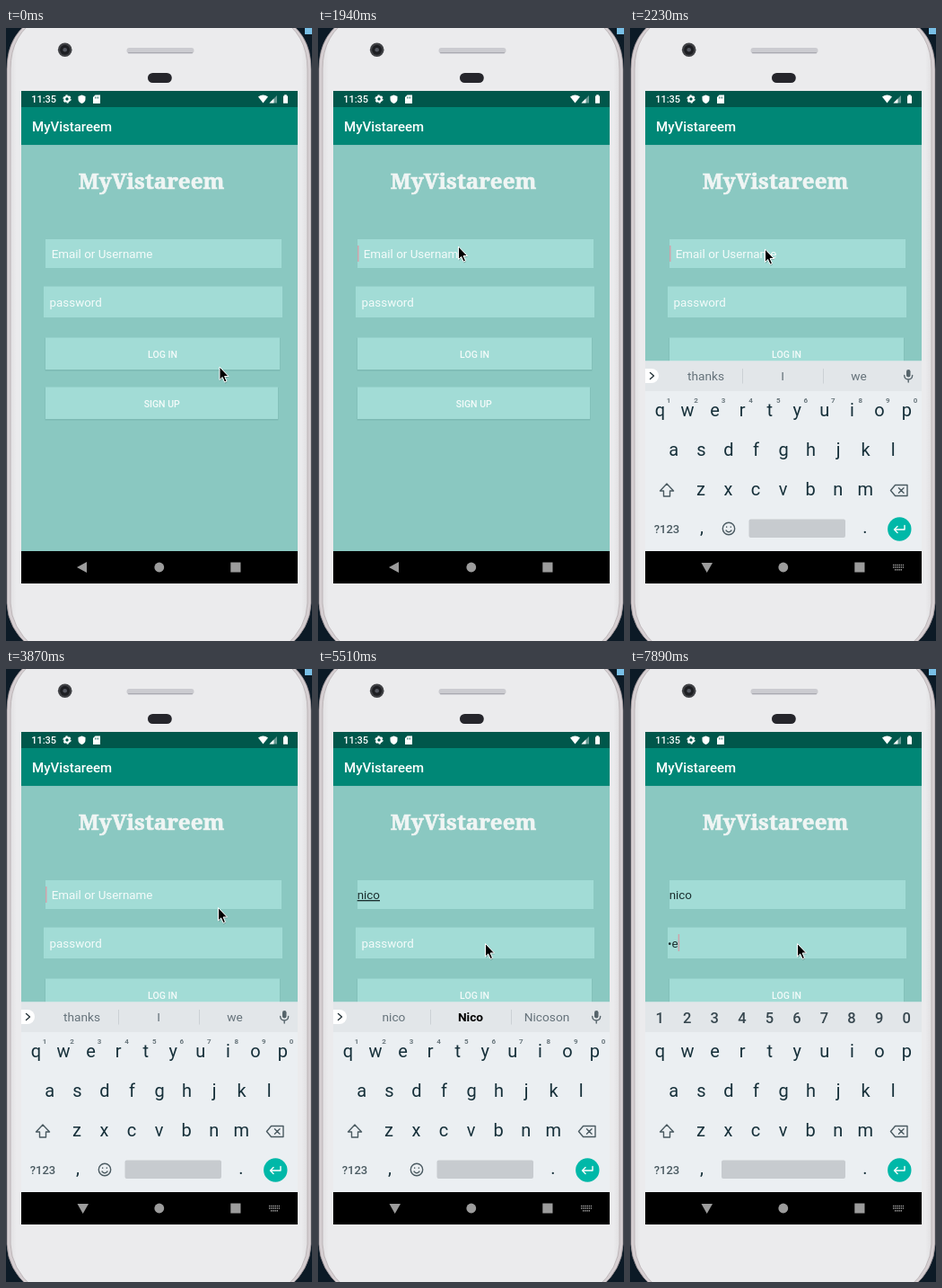
Write an HTML page that moves like this. It is 341 px wide and 682 px high and loops after 8 s.

```html
<!DOCTYPE html>
<html lang="en">
<head>
<meta charset="utf-8">
<title>Login screen</title>
<style>
  html, body { margin: 0; width: 100%; height: 100%; overflow: hidden; background: #0c1a26; }
  svg { display: block; width: 100vw; height: 100vh; }
  text { font-family: Roboto, sans-serif; white-space: pre; }
  .mid { text-anchor: middle; }
  .field { fill: #a2dcd6; }
  .shade { fill: #7dbab3; }
  .hint { font-size: 13.4px; fill: #f4fbfa; }
  .typed { font-size: 13.4px; fill: #1b2f2f; }
  .button { font-size: 10.5px; font-weight: 500; fill: #f4fbfa; }
  .logo { font: bold 24.2px "Noto Serif", serif; fill: #f0f5f4; stroke: #f0f5f4; stroke-width: .7; }
  .key { font-size: 20px; fill: #16303a; }
  .small { font-size: 8px; font-weight: 700; fill: #6a777d; }
  .digit { font-size: 16.5px; font-weight: 500; fill: #37474f; }
  .word { font-size: 13.7px; fill: #65727a; }
  .line { fill: none; stroke: #4a5a61; stroke-width: 1.4; stroke-linejoin: round; stroke-linecap: round; }
</style>
</head>
<body>
<svg viewBox="0 0 341 682" preserveAspectRatio="none">
  <defs>
    <linearGradient id="body">
      <stop offset="0" stop-color="#e2e1e3"/>
      <stop offset=".02" stop-color="#ebebed"/>
      <stop offset=".98" stop-color="#ebebed"/>
      <stop offset="1" stop-color="#e0dfe1"/>
    </linearGradient>
  </defs>

  <!-- phone -->
  <rect width="341" height="682" fill="#0c1a26"/>
  <rect x="333" width="8" height="7" fill="#79bfe6"/>
  <path d="M36 -12Q1 4 1 46V640Q2 668 26 688H315Q339 668 340 640V46Q340 4 305 -12Z" fill="#d6cfd2" stroke="#9a9094" stroke-width=".8"/>
  <path d="M38 -12Q5 6 5 46V640Q6 667 30 688H311Q335 667 336 640V46Q336 6 303 -12Z" fill="url(#body)" stroke="#b3abae" stroke-width=".8"/>
  <circle cx="65.700" cy="24.300" r="7.800" fill="#3f4044"/>
  <circle cx="65.700" cy="24.300" r="5.500" fill="#1d1e22"/>
  <circle cx="65.700" cy="24.300" r="2.300" fill="#53565f"/>
  <rect x="134.500" y="22" width="75" height="6.300" rx="3" fill="#cbcbd0"/>
  <rect x="136" y="27" width="72" height="1.300" rx=".6" fill="#a9a9b0"/>
  <rect x="158" y="50" width="26.800" height="11" rx="5.500" fill="#25252b"/>

  <!-- app -->
  <rect x="17" y="70" width="308" height="548" fill="#8ac8c1"/>
  <rect x="17" y="130" width="308" height="1" fill="#84c2bb"/>
  <rect x="17" y="70" width="308" height="18" fill="#00574b"/>
  <rect x="17" y="88" width="308" height="42" fill="#008776"/>
  <g fill="#fff">
    <text x="28.200" y="83" font-size="11" font-weight="500">11:35</text>
    <circle cx="68" cy="79" r="2.700" fill="none" stroke="#fff" stroke-width="2"/>
    <circle cx="68" cy="79" r="4" fill="none" stroke="#fff" stroke-width="1.300" stroke-dasharray="2.200 1.989"/>
    <path d="M84.500 74.500L88.500 76V79Q88.500 82.500 84.500 84Q80.500 82.500 80.500 79V76Z"/>
    <path d="M99.500 74.500H105V84H97V77Z"/>
    <path d="M99.500 76.500V78.500M101.300 76.500V78.500M103 76.500V78.500" stroke="#00574b" stroke-width=".7"/>
    <path d="M281 76.500Q286.500 72.500 292 76.500L286.500 83.500Z"/>
    <path d="M302 75V83.500H293.500Z" opacity=".4"/>
    <path d="M298.500 78.500V83.500H293.500Z"/>
    <path d="M309 75.500H310.200V74.300H312.800V75.500H314V83.800H309Z"/>
    <text x="29" y="115" font-size="15" font-weight="500">MyVistareem</text>
  </g>
  <text class="logo mid" x="162" y="179">MyVistareem</text>

  <rect class="field" x="44" y="235" width="263" height="32"/>
  <rect class="field" x="42" y="287.500" width="266" height="34.500"/>
  <rect class="shade" x="43.500" y="345" width="262" height="36.500"/>
  <rect class="field" x="44" y="344.500" width="261" height="35.500"/>
  <rect class="shade" x="43.500" y="400" width="260" height="36.500"/>
  <rect class="field" x="44" y="399.500" width="259" height="35.500"/>
  <text class="button mid" x="174.500" y="366.500">LOG IN</text>
  <text class="button mid" x="173.700" y="422">SIGN UP</text>
  <text id="userHint" class="hint" x="50.700" y="256">Email or Username</text>
  <text id="passHint" class="hint" x="48.500" y="310">password</text>
  <text id="user" class="typed" x="43.700" y="256"></text>
  <text id="pass" class="typed" x="42" y="310"></text>
  <rect id="caret" width="1.500" fill="#cfa3ab"/>

  <!-- navigation bar -->
  <rect x="17" y="582" width="308" height="36" fill="#000"/>
  <g fill="#9c9c9c">
    <path id="back" d="M79 600L90 594V606Z"/>
    <path id="down" d="M79.500 595H92L85.700 606Z"/>
    <circle cx="170.800" cy="600" r="5.400"/>
    <rect x="250.300" y="594.500" width="11.200" height="11"/>
    <path id="keysIcon" d="M293 597.500H305M293 600H305M295 602.700H303" stroke="#9c9c9c" stroke-width="1.400" stroke-dasharray="1.400 .8"/>
  </g>

  <!-- keyboard -->
  <g id="keyboard">
    <rect x="17" y="370.500" width="308" height="211.500" fill="#ebeff2"/>
    <rect x="17" y="370.500" width="308" height="33.500" fill="#e2e6e9"/>
    <g id="letters"></g>
    <g id="wordStrip">
      <path d="M17 379H24A8 8 0 0 1 24 395H17Z" fill="#fff"/>
      <path class="line" d="M22.500 383.500L26.500 387L22.500 390.500" style="stroke:#26343a"/>
      <path d="M125.500 379V395.500M215.500 379V395.500" stroke="#cbd0d4"/>
      <text class="word mid" x="84.500" y="392"></text>
      <text class="word mid" x="170" y="392"></text>
      <text class="word mid" x="255" y="392"></text>
      <rect x="308" y="380" width="4.500" height="8.500" rx="2.250" fill="#56646b"/>
      <path class="line" d="M305.700 386.500Q306 391 310.200 391T314.700 386.500M310.200 391V394" style="stroke:#56646b"/>
      <g id="smallDigits"></g>
      <circle class="line" cx="110" cy="557" r="6.700"/>
      <path class="line" d="M107 559Q110 562.500 113 559M107.700 555V555.200M112.300 555V555.200"/>
    </g>
    <g id="digitStrip"></g>
    <path class="line" d="M41 507L48.500 515H44.500V521H37.500V515H33.500Z"/>
    <path class="line" d="M290.500 514.500L295.500 508.500H309V520.500H295.500ZM299.500 511.700L305 517.300M305 511.700L299.500 517.300"/>
    <text class="mid" x="41" y="561.500" font-size="13" font-weight="500" fill="#4a5a61">?123</text>
    <text class="key mid" x="80" y="562">,</text>
    <rect id="space" y="546.500" height="20.500" rx="2" fill="#c7cbcf"/>
    <text class="key mid" x="262" y="562">.</text>
    <circle cx="300.300" cy="557.500" r="13.200" fill="#00b8a8"/>
    <path class="line" d="M306 553.500V558H294.500M298 554.500L294.500 558L298 561.500" style="stroke:#fff"/>
  </g>

  <g id="pointer">
    <path d="M.5 1.500V16L3.700 13L6.100 18.400L8.500 17.300L6.100 12H10.500Z" fill="#000" opacity=".2"/>
    <path d="M0 0V14.500L3.200 11.500L5.600 17L8 16L5.600 10.500H10Z" fill="#000" stroke="#fff" stroke-linejoin="round"/>
  </g>
</svg>
<script>
const $ = id => document.getElementById(id);
const STEP = 30.55, LOOP = 8000;

function addKeys(group, chars, x, y, cls) {
  [...chars].forEach((char, i) => {
    const key = document.createElementNS("http://www.w3.org/2000/svg", "text");
    key.setAttribute("x", x + i * STEP);
    key.setAttribute("y", y);
    key.setAttribute("class", cls + " mid");
    key.textContent = char;
    $(group).append(key);
  });
}
addKeys("letters", "qwertyuiop", 33.5, 432, "key");
addKeys("letters", "asdfghjkl", 48.8, 476, "key");
addKeys("letters", "zxcvbnm", 79, 520, "key");
addKeys("smallDigits", "1234567890", 43, 417, "small");
addKeys("digitStrip", "1234567890", 33.2, 393.5, "digit");

const at = (x, y) => ({ pointer: [x, y] });
const caret = on => ({ caret: on });
const type = (user, ...rest) => ({ user, caret: true, words: [user, ...rest] });

// Each entry changes part of the state from its time on.
const events = [
  [0, { ...at(238, 377), caret: false, keyboard: 0, user: "", pass: "", secret: false, words: ["thanks", "I", "we"] }],
  [140, at(222, 350)], [290, at(188, 300)], [440, at(160, 263)], [590, at(152, 254)],
  [890, at(190, 282)], [1040, at(228, 306)],
  [1340, at(215, 290)], [1490, at(182, 260)], [1640, at(160, 245)],
  [1790, { ...at(156.5, 243), caret: true }],
  [2080, { keyboard: 0.6 }],
  [2230, { keyboard: 1, ...at(150.5, 246) }],
  [2380, at(152, 248)],
  [2530, { ...at(168, 252), caret: false }],
  [2680, at(198, 260)], [2830, at(226, 265)],
  [2970, { ...at(236.5, 265.5), caret: true }],
  [3420, caret(false)], [3870, caret(true)],
  [4020, type("n", "N", "no")],
  [4160, type("ni", "Ni", "nib")],
  [4460, type("nic", "Nico", "Nicoson")],
  [4760, type("nico", "Nico", "Nicoson")],
  [5210, { ...at(222, 277), caret: false }],
  [5360, at(197, 297)], [5510, at(186.5, 305.5)],
  [5650, { secret: true, caret: true }],
  [6100, caret(false)], [6700, caret(true)], [7150, caret(false)], [7590, caret(true)],
  [7740, { pass: "w" }], [7890, { pass: "•e" }]
];

const show = (id, on) => { $(id).style.display = on ? "" : "none"; };
const setAttrs = (el, attrs) => Object.entries(attrs).forEach(([k, v]) => el.setAttribute(k, v));
const wordSlots = document.querySelectorAll(".word");

function render(time) {
  const s = Object.assign({}, ...events.filter(e => e[0] <= time).map(e => e[1]));

  $("user").textContent = s.user;
  $("user").style.textDecoration = s.secret ? "none" : "underline";
  $("pass").textContent = s.pass;
  show("userHint", !s.user);
  show("passHint", !s.pass);

  const input = $(s.secret ? "pass" : "user");
  const left = s.secret ? 42 : 44;
  const width = input.textContent ? input.getComputedTextLength() : 0;
  show("caret", s.caret);
  setAttrs($("caret"), { x: left + width, y: s.secret ? 295 : 242, height: s.secret ? 19 : 18 });

  show("keyboard", s.keyboard);
  $("keyboard").setAttribute("opacity", s.keyboard);
  $("keyboard").setAttribute("transform", `translate(0 ${s.keyboard < 1 ? 34 : 0})`);
  show("back", !s.keyboard);
  show("down", s.keyboard);
  show("keysIcon", s.keyboard);
  show("wordStrip", !s.secret);
  show("digitStrip", s.secret);
  setAttrs($("space"), s.secret ? { x: 102, width: 138 } : { x: 132.5, width: 107.5 });

  wordSlots.forEach((slot, i) => {
    const strong = i === 1 && s.user;
    slot.textContent = s.words[i];
    slot.style.fontWeight = strong ? 700 : 400;
    slot.style.fill = strong ? "#000" : "";
  });
  $("pointer").setAttribute("transform", `translate(${s.pointer})`);
}

const start = performance.now();
function tick() {
  render((performance.now() - start) % LOOP);
  requestAnimationFrame(tick);
}
tick();
</script>
</body>
</html>
```
